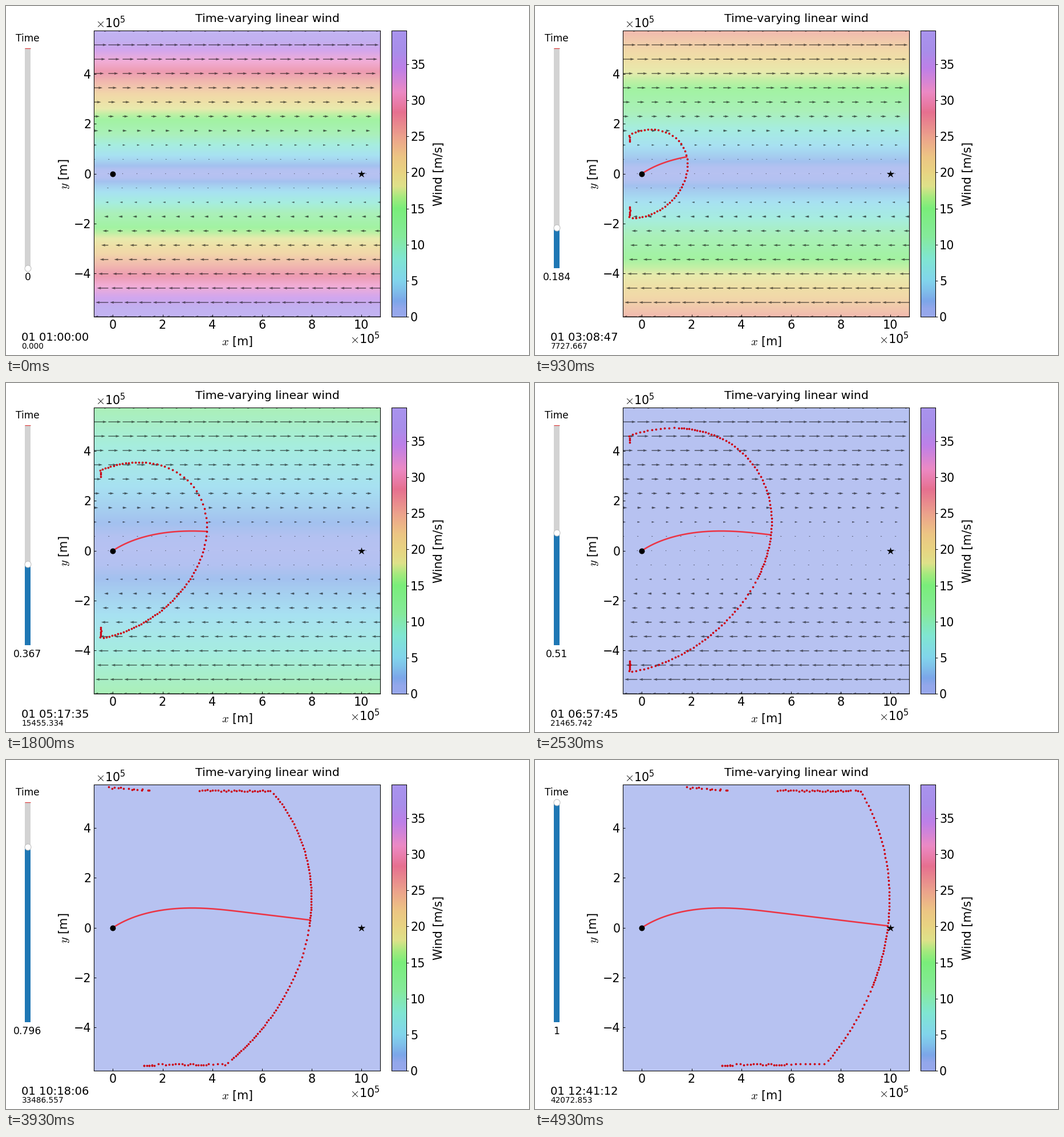
Animation of 917x611 px, one loop 5.06 s. Source, as a matplotlib script:

```python
import matplotlib.pyplot as plt
import numpy as np
from matplotlib.animation import FuncAnimation
from matplotlib.colors import LinearSegmentedColormap
from matplotlib.patches import Rectangle

W, H, DPI = 917, 611, 100
PT = 72 / DPI  # points per pixel
plt.rcParams.update({
    "font.family": "DejaVu Sans",
    "mathtext.fontset": "cm",
    "axes.linewidth": 0.75,
})

LOOP, INTERVAL = 5060, 20
LAST = 49                # last time step
TOTAL = 42072.8534       # seconds of flight
CALM = 25                # step at which the wind has died down
WIND_MAX = 39.68

# Lengths in 1e5 m, times in steps
SPEED = 23 * TOTAL / LAST / 1e5
SHEAR = 0.0632
SUB = 10
X_EDGE, Y_EDGE = -0.5, 5.5
X_LIM, Y_LIM = (-0.762, 10.765), (-5.752, 5.752)
MAX_GAP = 0.2

STOPS = [
    (0, "#98a8ec"), (1.1, "#93a7eb"), (2.1, "#7ca6e9"), (3.2, "#7fbaea"),
    (5, "#82d5ec"), (8, "#80e6d2"), (11, "#86ea9c"), (15, "#7aee7a"),
    (16.5, "#a4ea7e"), (18, "#dee28a"), (20, "#e8d482"), (22.2, "#ecc684"),
    (25, "#eca28c"), (28.4, "#e67090"), (31.2, "#ec8ac4"),
    (34.5, "#be80e8"), (37, "#a88eea"), (WIND_MAX, "#a894ee"),
]
wind_map = LinearSegmentedColormap.from_list(
    "wind", [(v / WIND_MAX, c) for v, c in STOPS], N=512)


def fly(heading):
    """Extremal paths from the origin in a shear wind that fades linearly."""
    cos, sin = np.cos(heading), np.sin(heading)
    pos = np.zeros((len(heading), 2))
    path = [pos]
    for i in range(LAST * SUB):
        t = (i + 0.5) / SUB
        tc = min(t, CALM)
        py = sin - cos * SHEAR * (tc - tc**2 / (2 * CALM))
        norm = np.hypot(cos, py)
        wind = SHEAR * (1 - tc / CALM) * pos[:, 1]
        velocity = np.column_stack([SPEED * cos / norm + wind, SPEED * py / norm])
        pos = pos + velocity / SUB
        path.append(pos)
    return np.array(path)


rng = np.random.default_rng(4)
headings = np.linspace(-np.pi, np.pi, 641)
paths = fly(headings)
route = fly(np.array([np.arctan(0.67)]))[:, 0]

gone = np.logical_or.accumulate(paths[:, :, 0] < X_EDGE, axis=0)
hit = np.logical_or.accumulate(np.abs(paths[:, :, 1]) > Y_EDGE, axis=0)
first_hit = hit.argmax(axis=0)
hit_pos = paths[first_hit, np.arange(len(headings))]
wall_jitter = rng.uniform(-0.035, 0.035, len(headings))

hook_jitter = rng.uniform(-0.035, 0.035, 7)
top_strip = np.linspace(0, 1.65, 14) + rng.uniform(-0.08, 0.08, 14)
bottom_strip = np.linspace(0, 0.42, 8) + rng.uniform(-0.04, 0.04, 8)
strip_jitter = rng.uniform(-0.03, 0.03, 14)


def refined(pos):
    """Halve the heading interval wherever neighbouring dots drift apart."""
    shown = np.zeros(len(pos), bool)
    step = 32
    shown[::step] = True
    while step > 1:
        gap = np.hypot(*np.diff(pos[::step], axis=0).T)
        middles = np.arange(step // 2, len(pos), step)
        shown[middles[gap > MAX_GAP]] = True
        step //= 2
    return shown


def front(k):
    i = k * SUB
    free, trapped = paths[i], hit[i]
    alive = ~gone[i] & ~(trapped & (np.cos(headings) < 0))
    pos = free.copy()
    pos[trapped, 0] = (hit_pos[:, 0] + SPEED * (i - first_hit) / SUB)[trapped]
    pos[trapped, 1] = (np.sign(hit_pos[:, 1]) * Y_EDGE + wall_jitter)[trapped]
    parts = [pos[alive & refined(pos)]]

    # dots held back at the left border
    for sign, count, length in ((1, 4, 0.28), (-1, 7, 0.42)):
        side = np.flatnonzero(alive & ~trapped & (sign * free[:, 1] > 0))
        if len(side):
            x, y = free[side[free[side, 0].argmin()]]
            if x < X_EDGE + 0.1:
                drop = np.linspace(0.04, length, count)
                parts.append(np.column_stack(
                    [X_EDGE + hook_jitter[:count], y - sign * drop]))

    # dots sliding along the top and bottom borders
    for sign, start, offsets, lift in ((1, 29, top_strip, 0.06),
                                       (-1, 28.1, bottom_strip, 0.02)):
        x = X_EDGE + SPEED * (k - start) - offsets
        y = sign * (Y_EDGE + 0.03 + lift * offsets) + strip_jitter[:len(x)]
        parts.append(np.column_stack([x, y])[x > X_EDGE])
    return np.concatenate(parts)


def slider_text(value):
    digits = next(n for n in range(4) if abs(value - round(value, n)) < 1e-3)
    return f"{value:.{digits}f}"


fig = plt.figure(figsize=(W / DPI, H / DPI), dpi=DPI, facecolor="white")


def add_axes(x0, y0, x1, y1):
    return fig.add_axes([x0 / W, 1 - y1 / H, (x1 - x0) / W, (y1 - y0) / H])


page = add_axes(0, 0, W, H)
page.set(xlim=(0, W), ylim=(H, 0))
page.axis("off")


def write(x, y, text, size, **kw):
    return page.text(x, y, text, fontsize=size * PT, **kw)


# Wind field
ax = add_axes(154.3, 43, 656.3, 544)
rows = np.linspace(Y_LIM[1], Y_LIM[0], 501)
speed = WIND_MAX * np.abs(rows[:, None]) / Y_LIM[1]
field = ax.imshow(speed, cmap=wind_map, vmin=0, vmax=WIND_MAX, alpha=0.7,
                  extent=(*X_LIM, *Y_LIM), aspect="auto",
                  interpolation="nearest")
gx, gy = np.meshgrid(np.linspace(*X_LIM, 21), np.linspace(*Y_LIM, 21))
arrows = ax.quiver(gx, gy, 0.574 * gy / Y_LIM[1], 0 * gy, angles="xy",
                   scale_units="xy", scale=1, width=0.00286,
                   color="black", alpha=0.6)
line, = ax.plot([], [], color="#f02a38", lw=2.6 * PT, alpha=0.93)
dots, = ax.plot([], [], "o", color="#cc0010", ms=3.7 * PT, mew=0)
ax.plot(0, 0, "o", color="black", ms=10 * PT, mew=0, zorder=5)
ax.plot(10, 0, "*", color="black", ms=12.5 * PT, mew=0.4, zorder=5)
ax.set(xlim=X_LIM, ylim=Y_LIM, xticks=range(0, 11, 2), yticks=range(-4, 5, 2))
ax.tick_params(direction="in", length=2.6, width=0.7, pad=3.5,
               labelsize=20.8 * PT)

# Colour bar
bar = add_axes(676.3, 43, 702, 544)
bar.imshow(np.linspace(WIND_MAX, 0, 502)[:, None], cmap=wind_map,
           extent=(0, 1, 0, WIND_MAX), aspect="auto", interpolation="nearest")
bar.set(xticks=[], yticks=range(0, 36, 5))
bar.yaxis.tick_right()
bar.tick_params(length=2.6, width=0.7, pad=2.5, labelsize=20.8 * PT)

# Labels
write(458, 28.5, "Time-varying linear wind", 20.4, ha="center")
write(406, 594, "$x$ [m]", 20.8, ha="center")
write(102.5, 294, "$y$ [m]", 20.8, rotation=90, ha="center", va="center")
write(758.5, 294, "Wind [m/s]", 20.7, rotation=90, ha="center", va="center")
power = r"$\times\mathdefault{10^{5}}$"
write(157, 38.5, power, 20.8)
write(656, 591.5, power, 20.8, ha="right")

# Slider
TOP, BOTTOM = 73.5, 458.5
write(37.5, 62.5, "Time", 17, ha="center")
page.add_patch(Rectangle((33, TOP), 10, BOTTOM - TOP, color="lightgrey", lw=0))
page.plot([33, 43], [TOP, TOP], color="#e03c3c", lw=1.2 * PT,
          solid_capstyle="butt")
fill = page.add_patch(Rectangle((33, BOTTOM), 10, 0, color="#1f77b4", lw=0))
handle, = page.plot([38.3], [BOTTOM], "o", ms=11 * PT, mfc="white",
                    mec="0.75", mew=0.75, zorder=4)
value_text = write(38, 479.5, "", 17.2, ha="center")
clock = write(27, 586.5, "", 19.7)
seconds_text = write(27.5, 600, "", 13.6)


def update(frame):
    cycle, rest = divmod(frame * INTERVAL + INTERVAL // 2, 200)
    k = min(2 * cycle + (rest >= 130), LAST)
    value = k / LAST

    field.set_data(speed * max(0, 1 - k / CALM))
    arrows.set_visible(k <= CALM)
    line.set_data(*route[:k * SUB + 1].T)
    dots.set_data(*front(k).T)

    level = BOTTOM - value * (BOTTOM - TOP)
    fill.set_height(level - BOTTOM)
    handle.set_ydata([level])
    value_text.set_text(slider_text(value))

    seconds = value * TOTAL
    minutes, s = divmod(int(seconds) + 3600, 60)
    clock.set_text(f"01 {minutes // 60:02d}:{minutes % 60:02d}:{s:02d}")
    seconds_text.set_text(f"{seconds:.3f}")
    return field, arrows, line, dots, fill, handle, value_text, clock, seconds_text


anim = FuncAnimation(fig, update, frames=LOOP // INTERVAL, interval=INTERVAL,
                     init_func=lambda: update(0), repeat=True, repeat_delay=0)
plt.show()
```
